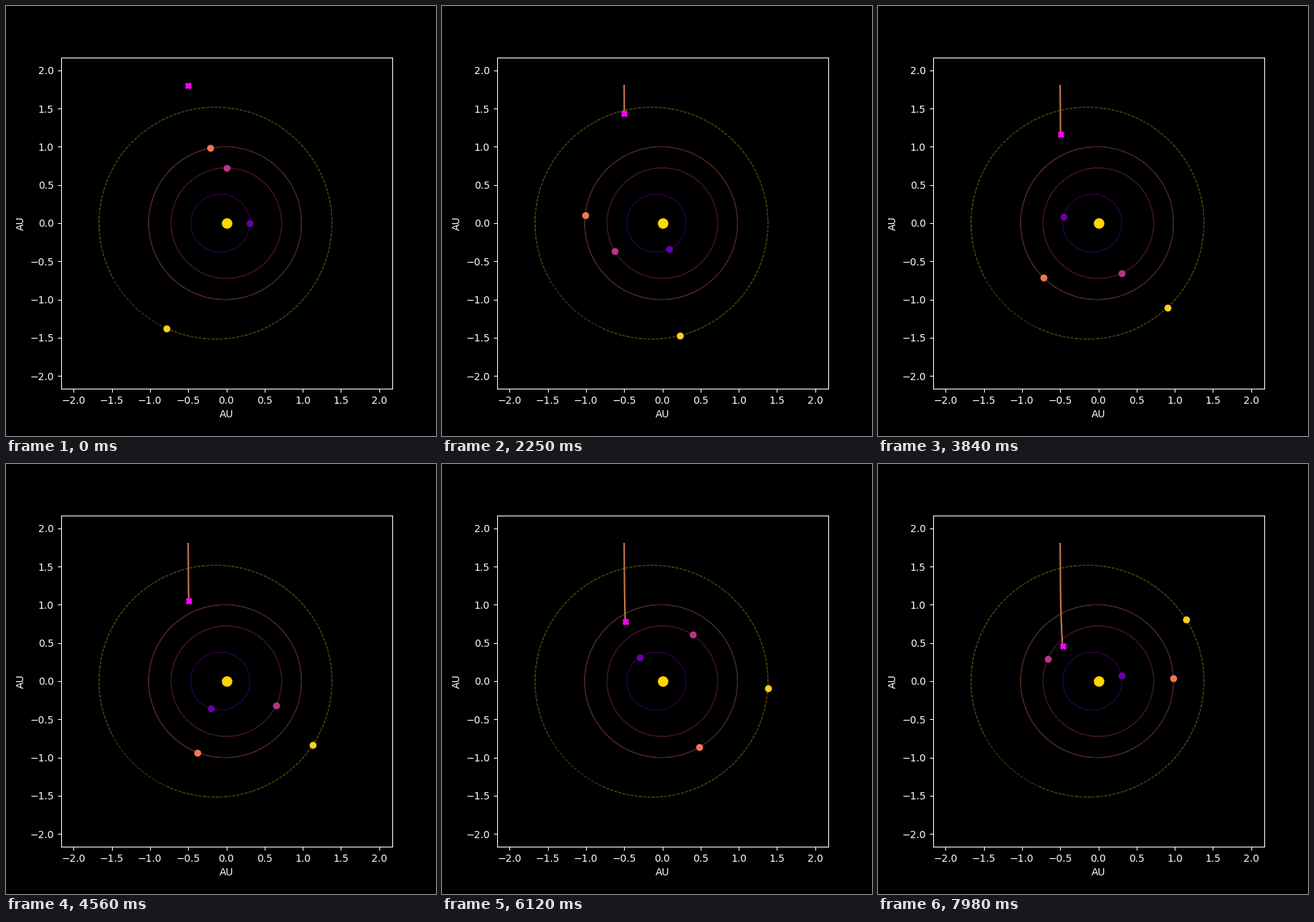
A matplotlib script that plays this animation: 600 px wide and 600 px high, repeating every 8 s.

```python
import numpy as np
import matplotlib.pyplot as plt
from matplotlib.animation import FuncAnimation

LOOP_MS = 8000
DAYS = 267          # one day of simulated time per frame
ORBIT_DAYS = 1300   # length of the dashed orbit traces
YEAR = 365.25

# semi-major axis (AU), eccentricity, mean anomaly at start (degrees)
PLANETS = [
    (0.3871, 0.2056, 0),
    (0.7233, 0.0, 90),
    (1.0, 0.0167, 100),
    (1.5237, 0.0934, 250),
]


def orbit(a, e, start, day):
    """Position on a Kepler ellipse with the sun at the origin."""
    mean = np.radians(start) + 2 * np.pi * day / (YEAR * a ** 1.5)
    ecc = mean + e * np.sin(mean)
    for _ in range(6):
        ecc -= (ecc - e * np.sin(ecc) - mean) / (1 - e * np.cos(ecc))
    return a * (np.cos(ecc) - e), a * np.sqrt(1 - e * e) * np.sin(ecc)


def probe_path(day):
    """Nearly straight fall, bending slowly towards the sun."""
    u = day / (DAYS - 1)
    x = -0.5 + 0.008 * u + 0.024 * u ** 4
    y = 1.8 - 0.0049 * day - 0.035 * u ** 2.5
    return x, y


plt.style.use("dark_background")
fig, ax = plt.subplots(figsize=(6, 6), dpi=100)
limit = 1.3 * PLANETS[-1][0] * (1 + PLANETS[-1][1])
ax.set_xlim(-limit, limit)
ax.set_ylim(-limit, limit)
ax.set_aspect("equal")
ax.set_xlabel("AU")
ax.set_ylabel("AU")

colors = plt.cm.plasma(np.linspace(0.2, 0.9, len(PLANETS)))
trace_days = np.arange(ORBIT_DAYS, dtype=float)
tracks, dots = [], []
for planet, color in zip(PLANETS, colors):
    ax.plot(*orbit(*planet, trace_days), "--", color=color, lw=0.8, alpha=0.3)
    tracks.append(orbit(*planet, np.arange(DAYS, dtype=float)))
    dots.append(ax.plot([], [], "o", color=color, ms=6, zorder=4)[0])

ax.plot(0, 0, "o", color="gold", ms=9.5, zorder=3)
trail, = ax.plot([], [], color=(0.78, 0.48, 0.31), lw=1.5, zorder=3)
probe, = ax.plot([], [], "X", color="magenta", ms=6, zorder=5)
px, py = probe_path(np.arange(DAYS, dtype=float))


def update(day):
    for dot, (x, y) in zip(dots, tracks):
        dot.set_data([x[day]], [y[day]])
    trail.set_data(px[:day + 1], py[:day + 1])
    probe.set_data([px[day]], [py[day]])
    return [*dots, trail, probe]


anim = FuncAnimation(fig, update, frames=DAYS, interval=LOOP_MS / DAYS,
                     init_func=lambda: update(0), repeat=True,
                     repeat_delay=0, blit=False)
plt.show()
```
